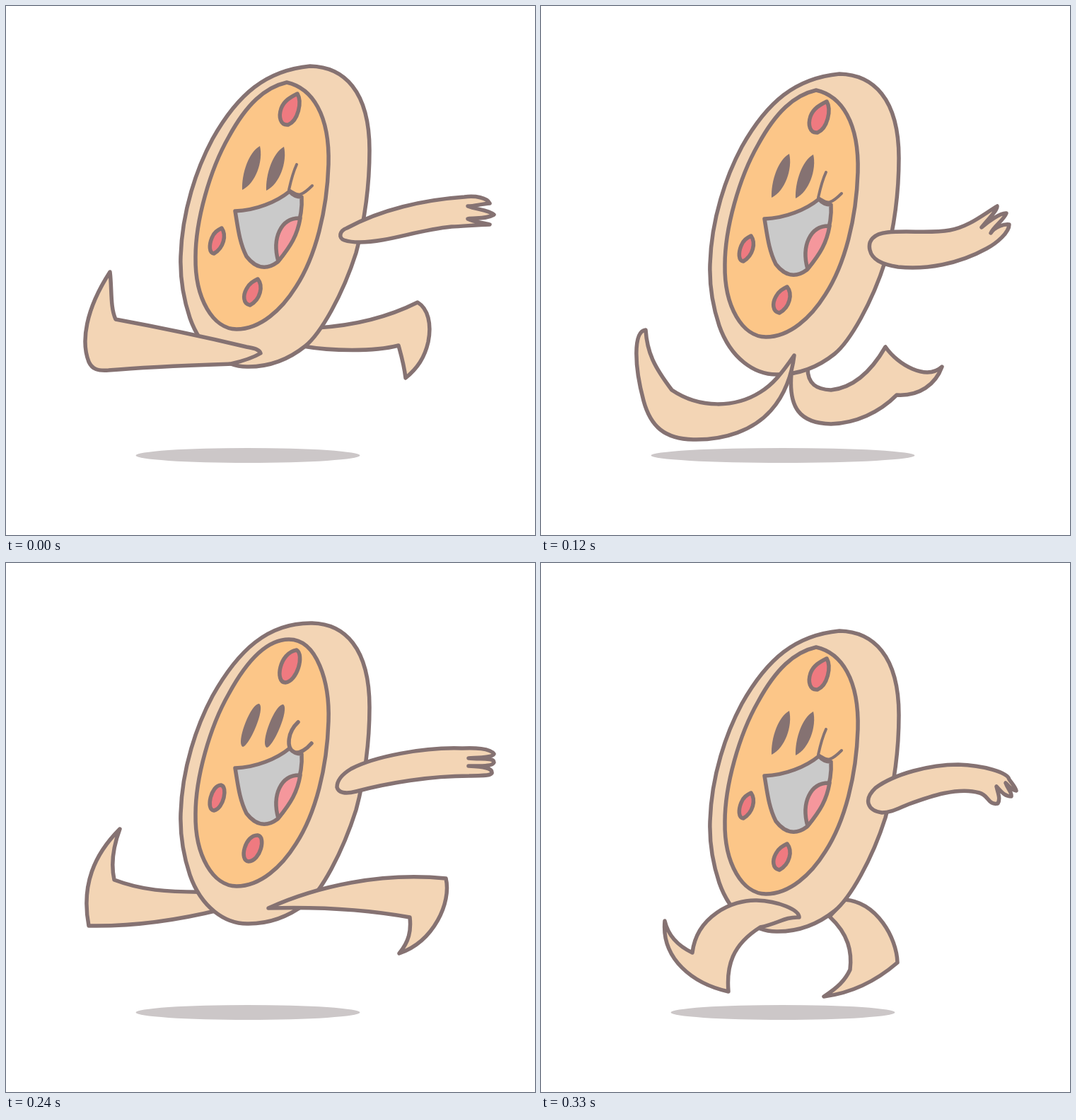
These frames come from a looping animation (748 px wide and 748 px high, 360 ms). An HTML page:

```html
<!DOCTYPE html>
<html lang="en">
<head>
<meta charset="utf-8">
<title>Running pizza</title>
<style>
html, body { margin: 0; width: 100%; height: 100%; overflow: hidden; background: #fff; }
svg {
  display: block; width: 100vw; height: 100vh;
  --r: 0;
  animation: boil 360ms -.5ms step-end infinite;
}
path { fill: #f3d5b5; stroke: #857272; stroke-width: 5.5; stroke-linecap: round; stroke-linejoin: round; }
ellipse { fill: #ccc7c8; }
.line { fill: none; }
.cheese { fill: #fcc688; }
.red { fill: #ef7a80; }
.mouth { fill: #cacaca; }
.tongue { fill: #f5979c; }
.eye { fill: #857272; stroke: none; }
.thin { stroke-width: 4; }

/* two line styles: round and sharp */
.r { opacity: var(--r); }
.p { opacity: calc(1 - var(--r)); }

/* each stride is half the loop: fly 90 ms, land 60 ms, push 30 ms */
.left, .right { animation: half 360ms -.5ms step-end infinite; }
.right { animation-delay: -180.5ms; }
.fly { animation: half 180ms -.5ms step-end infinite; }
.land { animation: third 180ms -90.5ms step-end infinite; }
.push { animation: sixth 180ms -30.5ms step-end infinite; }
.bob { animation: bob 180ms -.5ms step-end infinite; }

@keyframes half { 0% { opacity: 1 } 50%, 100% { opacity: 0 } }
@keyframes third { 0% { opacity: 1 } 33.33%, 100% { opacity: 0 } }
@keyframes sixth { 0% { opacity: 1 } 16.66%, 100% { opacity: 0 } }
@keyframes bob { 0% { transform: translate(8px, -11px) } 50%, 100% { transform: none } }
@keyframes boil {
  0%, 16.66%, 33.33%, 58.33%, 75%, 91.66%, 100% { --r: 0 }
  8.33%, 25%, 50%, 66.66%, 83.33% { --r: 1 }
}
</style>
</head>
<body>
<svg viewBox="0 0 748 748">
  <!-- shadow and far legs -->
  <g class="left">
    <g class="fly">
      <ellipse cx="342" cy="635.5" rx="158.5" ry="10.5"/>
      <path d="M440 455C490 452 540 440 582 419C597 428 602 450 597 475C592 497 582 512 565 526C563 508 560 498 555 480C520 489 460 488 420 481Z"/>
    </g>
    <g class="land">
      <ellipse cx="342" cy="635.5" rx="186.5" ry="10.5"/>
      <path d="M354 520C350 567 365 590 410 591C445 590 478 575 503 550C535 552 558 535 567 510C545 530 505 508 487 482C465 520 440 540 410 543C390 542 377 535 377 512Z"/>
    </g>
    <g class="push">
      <ellipse cx="342" cy="635.5" rx="134.5" ry="10.5"/>
      <path d="M133 491C140 525 160 548 187 566C185 510 215 478 272 476L288 497C248 525 240 555 264 605C225 604 180 592 152 565C138 545 130 525 133 491Z"/>
    </g>
  </g>
  <g class="right">
    <g class="fly">
      <ellipse cx="342" cy="635.5" rx="158.5" ry="10.5"/>
      <path d="M161 376C125 412 106 455 117 513C170 514 235 507 304 490L290 465C225 466 190 462 153 448C148 425 152 400 161 376Z"/>
    </g>
    <g class="land">
      <ellipse cx="342" cy="635.5" rx="151" ry="10.5"/>
      <path d="M130 434C113 475 118 535 155 567C200 577 245 568 268 543C280 530 286 520 291 500L270 478C250 515 230 526 207 526C170 524 130 490 130 434Z"/>
    </g>
    <g class="push">
      <ellipse cx="342" cy="635.5" rx="158.5" ry="10.5"/>
      <path d="M408 500C435 525 440 550 437 575C430 590 420 600 400 613C440 608 475 590 504 565C503 530 475 480 430 476Z"/>
    </g>
  </g>

  <!-- body -->
  <g class="bob">
    <g class="r">
      <path d="M425 96C470 97 506 130 506 215C506 265 499 315 487 360C468 420 437 478 415 493C390 512 365 521 335 521C302 522 268 498 252 452C243 425 238 395 239 365C241 300 262 240 284 199C320 135 362 95 425 96Z"/>
      <path class="cheese" d="M392 119C432 119 450 180 448 235C446 300 430 365 402 408C382 440 352 468 318 468C285 468 259 425 260 366C260 315 280 243 307 196C332 150 360 119 392 119Z"/>
      <path class="red" d="M403 134C414 141 404 178 387 180C372 180 378 138 403 134Z"/>
      <path class="red" d="M296 325C306 327 300 358 286 361C274 360 282 325 296 325Z"/>
      <path class="red" d="M348 396C360 398 352 432 335 433C321 432 330 395 348 396Z"/>
      <path id="eyeR" class="eye" d="M350 210C359 216 337 268 327 271C316 267 338 209 350 210Z"/>
      <use href="#eyeR" x="34" y="1"/>
      <path class="line" d="M405 236C390 250 388 272 399 279C408 281 418 273 424 266"/>
    </g>
    <g class="p">
      <path d="M422 96C469 97 506 130 506 215C506 265 499 315 487 360C468 420 437 474 415 492C390 512 365 521 335 521C302 522 268 498 252 452C243 425 238 395 239 365C241 300 262 240 284 199C320 135 360 102 422 96Z"/>
      <path class="cheese" d="M389 119C425 127 450 165 448 235C446 300 430 365 402 408C382 440 352 468 318 468C285 468 259 425 260 366C260 315 280 243 307 196C332 150 358 126 389 119Z"/>
      <path class="red" d="M404 135C411 147 405 173 391 179C380 180 377 168 381 156C385 145 394 140 404 135Z"/>
      <path class="red" d="M297 325C304 335 300 353 286 361C279 360 279 349 283 339C286 331 291 328 297 325Z"/>
      <path class="red" d="M348 397C356 407 352 426 337 434C327 432 327 420 332 411C336 403 342 400 348 397Z"/>
      <path id="eyeP" class="eye" d="M351 209C356 230 345 262 326 271C325 248 335 218 351 209Z"/>
      <use href="#eyeP" x="34" y="1"/>
      <path class="line thin" d="M403 235C397 248 394 262 392 271C400 276 405 279 409 277C415 275 420 270 425 265"/>
    </g>
    <path class="mouth" d="M316 301C345 300 375 288 393 273C397 278 403 281 410 281C412 310 400 345 376 373C360 385 345 382 332 365C322 345 320 325 316 301Z"/>
    <path class="tongue" d="M408 311C380 310 368 340 377 372C395 350 404 335 408 311Z"/>
  </g>

  <!-- near legs -->
  <g class="left">
    <path class="fly" d="M147 376C112 430 106 475 117 503C122 514 130 516 145 515C200 510 260 508 318 506C335 502 350 497 360 491C358 485 350 484 340 482C290 470 220 455 155 443C147 425 150 400 147 376Z"/>
    <path class="land" d="M148 458C130 460 132 510 145 558C155 595 175 612 215 613C260 614 300 600 325 572C345 550 355 520 358 494C340 520 328 535 310 546C275 568 225 570 185 543C160 510 150 490 148 458Z"/>
    <path class="push" d="M380 499C420 475 470 478 505 484C535 492 560 510 571 533C568 560 530 595 477 599C490 592 497 580 502 567C480 520 430 495 380 499Z"/>
  </g>
  <g class="right">
    <path class="fly" d="M371 488C440 457 530 437 622 446C630 480 605 535 556 552C570 535 573 520 571 501C510 490 440 486 371 488Z"/>
    <path class="land" d="M389 474C375 490 360 520 364 545C368 568 390 575 412 574C440 572 465 560 482 543C500 563 545 560 563 541C535 545 505 520 508 464C480 487 450 513 418 514C395 514 385 495 389 474Z"/>
    <path class="push" d="M175 506C180 528 195 542 214 551C220 500 270 476 305 477C335 478 365 490 365 501C345 500 335 510 310 515C270 540 262 570 265 606C215 595 170 560 175 506Z"/>
  </g>

  <!-- arm -->
  <g class="fly">
    <path class="r" d="M495 323C480 327 470 325 468 317C468 305 478 297 488 291C520 274 590 260 645 262C662 261 685 262 690 270C688 275 670 275 654 276C670 278 690 274 690 282C688 288 670 287 654 287C675 288 688 290 687 297C684 302 670 300 655 301C600 301 540 311 495 323Z"/>
    <path class="p" d="M478 331C470 328 471 318 482 314C530 288 590 274 648 270C664 268 680 271 684 279C672 280 662 283 653 283C665 288 682 288 690 295C678 302 664 299 653 301C663 306 675 306 684 309C665 309 645 312 630 312C580 317 540 334 500 334C490 334 484 333 478 331Z"/>
  </g>
  <path class="land" d="M465 345C462 332 470 322 490 320C520 317 550 322 578 317C605 312 625 295 645 283C645 290 633 300 623 313C632 305 650 292 658 293C655 302 640 312 636 321C642 312 655 308 662 309C662 320 645 335 630 343C590 365 545 373 505 369C480 365 468 358 465 345Z"/>
  <path class="push" d="M482 353C462 350 455 335 473 318C500 298 550 285 590 285C625 286 660 296 662 306C667 313 671 317 672 322C664 321 660 313 657 311C660 320 666 324 665 330C655 330 650 322 644 316C646 325 650 333 646 340C632 343 633 328 620 325C590 316 550 330 520 341C505 347 495 353 482 353Z"/>
</svg>
</body>
</html>
```
